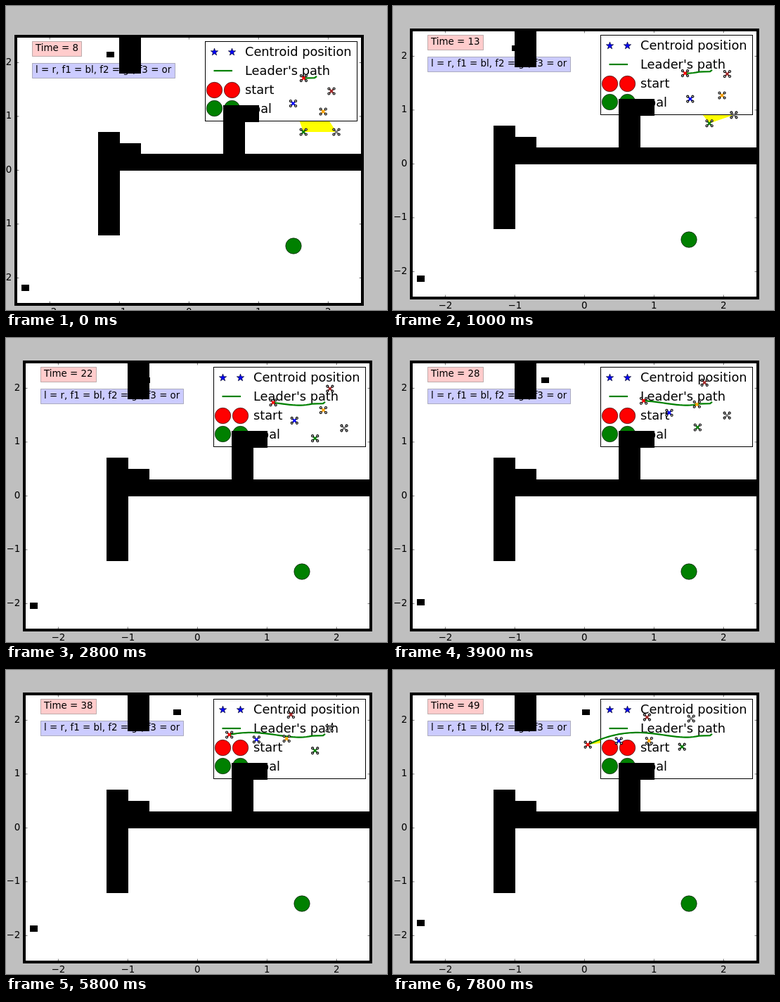
Animation of 542x432 px, one loop 8000 ms. Source, as an HTML page:

```html
<!DOCTYPE html>
<html lang="en">
<head>
<meta charset="utf-8">
<title>Formation control</title>
<style>
  html, body { margin: 0; width: 100%; height: 100%; overflow: hidden; background: #bfbfbf; }
  svg { display: block; width: 542px; height: 432px; }
  text { font: 13.4px "DejaVu Sans", sans-serif; }
  .legend text { font-size: 17.78px; }
  .disc { stroke: #000; stroke-width: .6; }
  .walls rect { stroke: #000; }
</style>
</head>
<body>
<svg viewBox="0 0 542 432">
  <defs>
    <clipPath id="inside"><rect x="26" y="34" width="493" height="381"/></clipPath>
    <path id="star" d="M0-5.5 1.3-1.7 5.2-1.7 2.1.7 3.2 4.4 0 2.2-3.2 4.4-2.1.7-5.2-1.7-1.3-1.7Z"
      fill="#00f" stroke="#000" stroke-width=".6"/>
    <g id="drone">
      <path d="M-3.2-3.2 3.2 3.2M-3.2 3.2 3.2-3.2" stroke="#000" stroke-width="1.4"/>
      <path d="M-2.2-2.2 2.2 2.2M-2.2 2.2 2.2-2.2" stroke="currentColor" stroke-width="2"/>
      <g fill="#ddd" stroke="#000" stroke-width="1.1">
        <circle cx="-3.6" cy="-3.5" r="1.5"/><circle cx="3.6" cy="-3.5" r="1.5"/>
        <circle cx="-3.6" cy="3.5" r="1.5"/><circle cx="3.6" cy="3.5" r="1.5"/>
      </g>
    </g>
  </defs>
  <g id="figure">
    <rect x="26" y="34" width="493" height="381" fill="#fff"/>
    <g id="ticks" stroke="#000" stroke-width=".6"></g>
    <g id="labels"></g>
    <circle class="disc" cx="421" cy="332" r="11.2" fill="green"/>
    <polygon id="area" fill="#ff0"/>

    <g stroke="#000" stroke-opacity=".25">
      <rect id="timeBox" x="49.5" y="41.5" height="21" fill="#fcc"/>
      <rect x="49.5" y="72.5" width="203" height="21" fill="#ccf"/>
    </g>
    <text id="time" x="54" y="55.4"></text>
    <text x="54" y="86.4">l = r, f1 = bl, f2 = gr, f3 = or</text>

    <g id="legend" class="legend">
      <rect x="295.5" y="41.5" width="216" height="113" fill="#fff" stroke="#000"/>
      <path d="M307.5 83H334" stroke="green" stroke-width="2.2"/>
    </g>

    <g id="walls" class="walls" clip-path="url(#inside)"></g>
    <path id="trail" fill="none" stroke="green" stroke-width="2.2" stroke-linejoin="round"/>
    <g id="drones"></g>
    <rect x="26" y="34" width="493" height="381" fill="none" stroke="#000" stroke-width="4"/>
  </g>
</svg>
<script>
const $ = id => document.getElementById(id);
const add = (parent, tag, attrs, text = '') => {
  const el = document.createElementNS('http://www.w3.org/2000/svg', tag);
  for (const name in attrs) el.setAttribute(name, attrs[name]);
  el.textContent = text;
  return parent.appendChild(el);
};

// Plot units to pixels; snap puts one-pixel strokes on whole pixels.
const px = x => 272.35 + 99 * x;
const py = y => 224.4 - 76.5 * y;
const snap = v => Math.floor(v) + .5;

for (let v = -2; v <= 2; v++) {
  const x = px(v), y = py(v), label = String(v).replace('-', '\u2212');
  add($('ticks'), 'path', { d: `M${x} 415v-4.4M${x} 34v4.4M26 ${y}h4.4M519 ${y}h-4.4` });
  add($('labels'), 'text', { x, y: 430.4, 'text-anchor': 'middle' }, label);
  add($('labels'), 'text', { x: 20.2, y: y + 3.4, 'text-anchor': 'end' }, label);
}

['Centroid position', "Leader's path", 'start', 'goal'].forEach((label, row) =>
  add($('legend'), 'text', { x: 352, y: 62 + 27 * row }, label));
for (const x of [308.5, 333.5]) {
  add($('legend'), 'use', { href: '#star', x, y: 56.5 });
  add($('legend'), 'circle', { class: 'disc', cx: x, cy: 110.5, r: 11.2, fill: 'red' });
  add($('legend'), 'circle', { class: 'disc', cx: x, cy: 136.5, r: 11.2, fill: 'green' });
}

// Walls in plot units: left, bottom, right, top.
function wall(l, b, r, t) {
  const x = snap(px(l)), y = snap(py(t));
  return add($('walls'), 'rect', { x, y, width: snap(px(r)) - x, height: snap(py(b)) - y });
}
wall(-1.3, -1.2, -1, .7);
wall(-1, .3, -.7, .5);
wall(-1, 0, 2.6, .3);
wall(.5, .3, .8, 1.2);
wall(.5, .9, 1, 1.2);
wall(-1, 1.8, -.7, 2.6);
const crossing = wall(0, 2.1, .1, 2.2);
const rising = wall(-2.4, -.05, -2.3, .05);

const first = 8, last = 49;

// Each drone flies a smooth curve through five points evenly spaced in time.
const drones = [
  ['red', [435.4, 93.6], [394.8, 93.8], [354.6, 89.1], [314.8, 92.6], [277.2, 106.1]],
  ['brown', [475, 112], [469, 81], [441.4, 63], [402.3, 64], [361.4, 67.1]],
  ['orange', [463.2, 141], [461, 111.5], [430.6, 94], [396.8, 98.3], [364.3, 100.5]],
  ['gray', [482, 170], [483.6, 139.3], [474.6, 108.6], [458.6, 81], [424.2, 69]],
  ['green', [435.2, 170], [446, 153.8], [433.2, 125.9], [440.2, 114.3], [411.2, 109.1]],
  ['blue', [420.5, 129.5], [417.8, 124.9], [391.3, 105.5], [353.6, 98.9], [321.2, 100.8]]
].map(([color, ...points]) => ({ points, el: add($('drones'), 'use', { href: '#drone', color }) }));

// Neville interpolation: blend neighbours until one point is left.
function place({ points }, n) {
  const s = (n - first) / (last - first) * (points.length - 1);
  let row = points;
  for (let k = 1; row.length > 1; k++) {
    row = row.slice(1).map((b, i) => b.map((v, axis) => {
      const a = row[i][axis];
      return a + (v - a) * (s - i) / k;
    }));
  }
  return row[0];
}

// Most counts last 200 ms; a few come 100 ms early.
const startOf = k => 200 * k - 100 * [12, 24, 28, 39].filter(early => k >= early).length;

function draw(ms) {
  let n = first;
  while (n < last && startOf(n + 1 - first) <= ms) n++;
  const slide = Math.max(0, 3 - Math.floor(ms / 100));
  $('figure').setAttribute('transform', `translate(${-4 * slide} ${3 * slide})`);
  $('time').textContent = 'Time = ' + n;
  $('timeBox').setAttribute('width', n < 10 ? 70 : 79);
  crossing.setAttribute('x', snap(155.5 + 2.78 * (n - first)));
  rising.setAttribute('y', snap(387 - .775 * (n - first)));

  const spots = drones.map(drone => place(drone, n));
  drones.forEach((drone, i) => drone.el.setAttribute('transform', `translate(${spots[i]})`));
  $('area').setAttribute('points', spots.join(' '));
  let path = 'M454 90.8L451 93.2L442 93.4';
  for (let j = first; j <= n; j++) path += 'L' + place(drones[0], j);
  $('trail').setAttribute('d', path);
}

const begin = performance.now();
function tick() {
  draw((performance.now() - begin) % 8000);
  requestAnimationFrame(tick);
}
tick();
</script>
</body>
</html>
```
